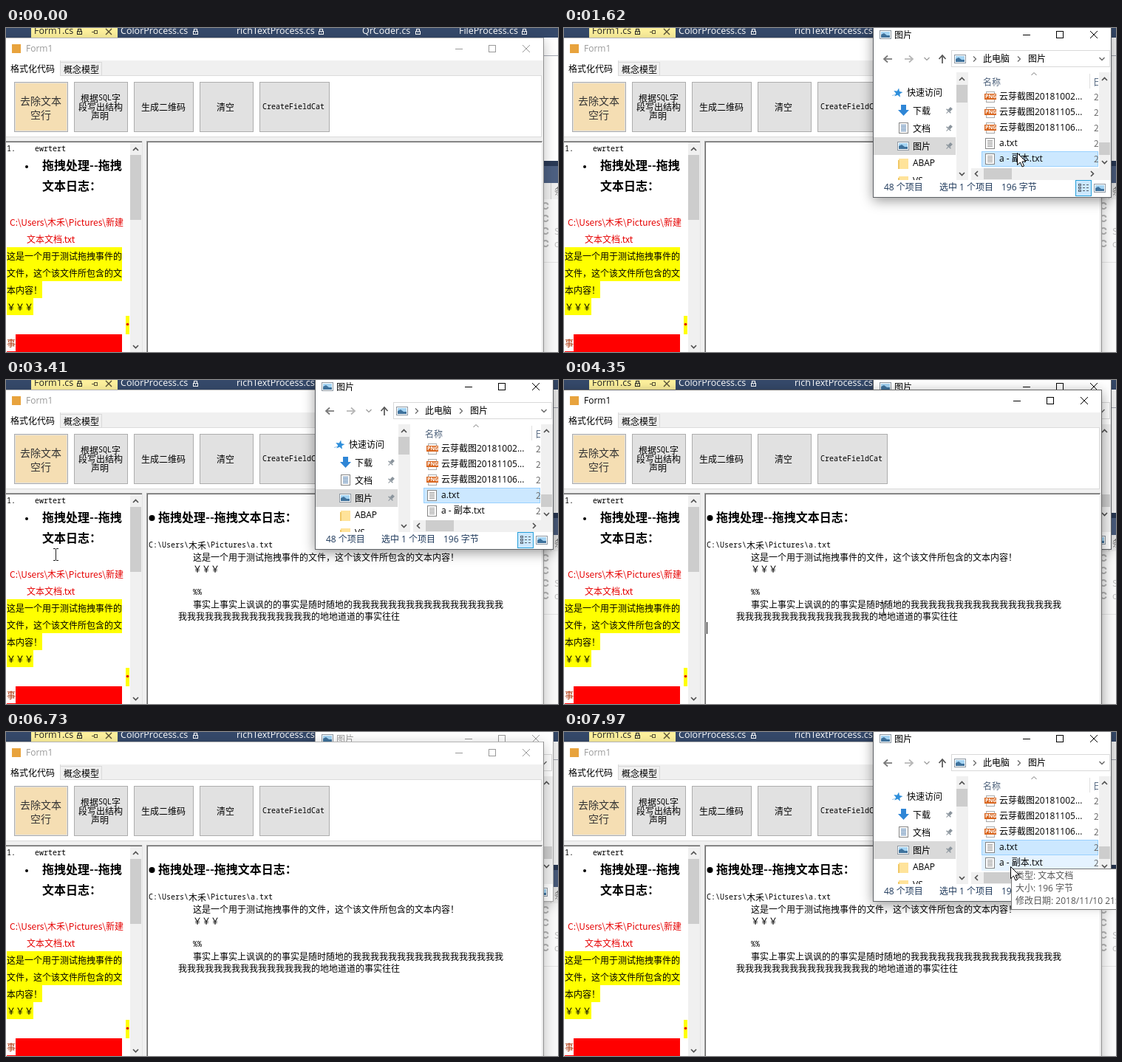
Write an HTML page with a canvas that moves like this. It is 747 px wide and 439 px high and loops after 8 s.

```html
<!DOCTYPE html>
<html lang="zh">
<head>
<meta charset="utf-8">
<title>Form1</title>
<style>
html, body { margin: 0; width: 100%; height: 100%; overflow: hidden; background: #fff; }
canvas { display: block; }
</style>
</head>
<body>
<canvas id="stage" width="747" height="439"></canvas>
<script>
const LOOP = 8000;
const ctx = document.getElementById('stage').getContext('2d');
const CJK = '"Noto Sans CJK SC", "Noto Sans CJK", "Noto Sans CJK JP", sans-serif';
const UI = '"Open Sans", "Noto Sans", sans-serif';
const MIXED = '"Open Sans", ' + CJK;
const MONO = '"Noto Sans Mono", monospace';
const USER = '木禾';

function rect(x, y, w, h, color) {
  ctx.fillStyle = color;
  ctx.fillRect(x, y, w, h);
}

function frame(x, y, w, h, color) {
  ctx.strokeStyle = color;
  ctx.lineWidth = 1;
  ctx.strokeRect(x + .5, y + .5, w - 1, h - 1);
}

function box(x, y, w, h, fill, edge) {
  rect(x, y, w, h, fill);
  frame(x, y, w, h, edge);
}

function raised(x, y, w, h, fill, strength) {
  ctx.save();
  ctx.shadowColor = `rgba(0,0,0,${strength})`;
  ctx.shadowBlur = 16;
  ctx.shadowOffsetY = 4;
  rect(x, y, w, h, fill);
  ctx.restore();
}

function line(color, width, ...p) {
  ctx.strokeStyle = color;
  ctx.lineWidth = width;
  ctx.beginPath();
  for (let i = 0; i < p.length; i += 2) ctx.lineTo(p[i], p[i + 1]);
  ctx.stroke();
}

function shape(color, ...p) {
  ctx.fillStyle = color;
  ctx.beginPath();
  for (let i = 0; i < p.length; i += 2) ctx.lineTo(p[i], p[i + 1]);
  ctx.closePath();
  ctx.fill();
}

function dot(x, y, r, color) {
  ctx.fillStyle = color;
  ctx.beginPath();
  ctx.arc(x, y, r, 0, 7);
  ctx.fill();
}

function text(s, x, y, color = '#000', font = '12px ' + CJK) {
  ctx.font = font;
  ctx.fillStyle = color;
  ctx.fillText(s, x, y);
}

// Song style: full-width glyphs of 12px, half-width ones of 6px
function song(s, x, y, color = '#000') {
  for (const run of s.match(/[ -~]+|[^ -~]+/g)) {
    const font = run < '\x7f' ? '10px ' + MONO : '12px ' + CJK;
    text(run, x, y, color, font);
    x += ctx.measureText(run).width;
  }
}

function chevron(x, y, dir, color = '#505050', width = 1.6) {
  ctx.save();
  ctx.translate(x, y);
  ctx.rotate(dir * Math.PI / 2);
  line(color, width, -3.5, 2, 0, -1.5, 3.5, 2);
  ctx.restore();
}

function arrow(x, y, dir, color) {
  ctx.save();
  ctx.translate(x, y);
  ctx.rotate(dir * Math.PI / 2);
  line(color, 1.7, 0, 6, 0, -5);
  line(color, 1.7, -4.5, 0, 0, -5, 4.5, 0);
  ctx.restore();
}

function windowButtons(x, y, color) {
  rect(x, y, 10, 1, color);
  frame(x + 45, y - 5, 10, 10, color);
  line(color, 1, x + 91, y - 5, x + 101, y + 5);
  line(color, 1, x + 101, y - 5, x + 91, y + 5);
}

function lock(x, color) {
  frame(x - 3, 4, 7, 5, color);
  frame(x - 2, 1, 5, 4, color);
  rect(x, 6, 1, 1, color);
}

function pin(x, y) {
  ctx.save();
  ctx.translate(x, y);
  ctx.rotate(.75);
  rect(-2, -5, 4, 5, '#8a949c');
  rect(-4, 0, 8, 1.5, '#8a949c');
  rect(-.5, 1, 1, 4, '#8a949c');
  ctx.restore();
}

function picture(x, y) {
  box(x, y, 16, 12, '#fff', '#8d98a3');
  rect(x + 2, y + 2, 12, 8, '#a5d4f3');
  shape('#3f729c', x + 2, y + 10, x + 2, y + 6, x + 6, y + 4, x + 10, y + 7, x + 14, y + 7, x + 14, y + 10);
}

function sheet(x, y, mark) {
  box(x, y, 13, 15, '#fff', '#858585');
  for (let i = 3; i < 13; i += 2) rect(x + 3, y + i, 7, 1, mark);
}

/* ---- editor behind everything ---- */
function editor() {
  rect(0, 0, 747, 439, '#fff');
  rect(0, 0, 747, 13, '#35496a');
  rect(34, 0, 117, 13, '#fff29d');
  const tabs = [['Form1.cs', 38, 99], ['ColorProcess.cs', 155, 256], ['richTextProcess.cs', 312, 426],
    ['QrCoder.cs', 482, 557], ['FileProcess.cs', 613, 701]];
  tabs.forEach(([name, x, lx], i) => {
    const c = i ? '#fff' : '#222';
    text(name, x, 5, c, '12.5px ' + UI);
    lock(lx, c);
  });
  line('#5a5338', 1, 116, 5.5, 119, 5.5);
  frame(119, 3, 5, 5, '#5a5338');
  line('#5a5338', 1.4, 135, 1, 143, 9);
  line('#5a5338', 1.4, 143, 1, 135, 9);
  rect(727, 37, 20, 1, '#a5a9b5');
  rect(727, 180, 20, 7, '#293955');
  rect(727, 187, 20, 23, '#4d6082');
  rect(727, 210, 20, 22, '#f0f0f0');
  rect(727, 232, 20, 207, '#fafafa');
  rect(727, 317, 20, 1, '#e4e4e4');
  rect(737, 210, 1, 22, '#d0d0d0');
  text('条', 742, 221, '#777');
  for (let i = 0; i < 4; i++) {
    const y = 241 + 17 * i;
    ctx.strokeStyle = '#b4b4b4';
    ctx.lineWidth = 2;
    for (const a of [.4, 3.5]) {
      ctx.beginPath();
      ctx.arc(730, y, 4, a, a + 2.4);
      ctx.stroke();
    }
  }
  text('S', 742, 275, '#c0c0c0');
  text('c', 742, 292, '#c0c0c0');
}

/* ---- Form1 ---- */
function scrollBar(x, y, h, thumbY, thumbH, w = 16) {
  rect(x, y, w, h, '#f0f0f0');
  rect(x, thumbY, w - 1, thumbH, '#cdcdcd');
  chevron(x + 7.5, y + 9, 0);
  chevron(x + 7.5, y + h - 8, 2);
}

function button(x, w, lines) {
  box(x, 73, w, 68, '#e1e1e1', '#adadad');
  lines.forEach(([s, dx, y]) => song(s, x + dx, y));
}

function log() {
  dot(197.5, 187, 4, '#000');
  text('拖拽处理--拖拽文本日志：', 206, 186, '#000', 'bold 16px ' + CJK);
  song(`C:\\Users\\${USER}\\Pictures\\a.txt`, 193, 224);
  song('这是一个用于测试拖拽事件的文件，这个该文件所包含的文本内容！', 253, 240);
  song('￥￥￥', 253, 256);
  song('%%', 253, 288);
  song('事实上事实上讽讽的的事实是随时随地的' + '我'.repeat(17), 253, 304);
  song('我'.repeat(15) + '的地地道道的事实往往', 233, 320);
}

function notes() {
  song('1.', 1, 164);
  song('ewrtert', 39, 164);
  dot(28, 188, 2, '#000');
  text('拖拽处理--拖拽', 49, 186, '#000', 'bold 16px ' + CJK);
  text('文本日志：', 49, 214, '#000', 'bold 16px ' + CJK);
  text(`C:\\Users\\${USER}\\Pictures\\新建`, 5, 263, '#e60000');
  text('文本文档.txt', 28, 286, '#e60000');
  const marked = [['这是一个用于测试拖拽事件的', 156], ['文件，这个该文件所包含的文', 156],
    ['本内容！', 48], ['￥￥￥', 36]];
  marked.forEach(([s, w], i) => {
    rect(1, 297 + 23 * i, w, 23, '#ff0');
    text(s, 1, 309 + 23 * i);
  });
  rect(162, 390, 5, 25, '#ff0');
  dot(164.5, 401.5, 1.8, '#e00000');
  text('事', 1, 427, '#b03a10');
  rect(13, 415, 144, 24, '#f00');
  rect(1, 438, 12, 1, '#f00');
}

function form(active, filled, caret) {
  const ink = active ? '#000' : '#999';
  raised(-20, 13, 748, 460, '#f0f0f0', active ? .4 : .25);
  rect(0, 13, 727, 31, '#fff');
  rect(0, 13, 728, 1, active ? '#6b6b6b' : '#b5b5b5');
  rect(727, 13, 1, 426, active ? '#6b6b6b' : '#8f8f8f');
  rect(8, 22, 12, 12, '#e8a33d');
  text('Form1', 27, 29, ink, '12px ' + UI);
  windowButtons(608, 28, ink);

  box(-1, 64, 726, 84, '#fff', '#dcdcdc');
  box(73, 46, 57, 19, '#f0f0f0', '#d9d9d9');
  rect(0, 44, 73, 22, '#fff');
  rect(73, 44, 1, 21, '#d9d9d9');
  song('格式化代码', 6, 55);
  song('概念模型', 78, 56);
  button(11, 73, []);
  rect(13, 75, 69, 64, '#f5deb3');
  text('去除文本', 19, 99, '#333', '14px ' + CJK);
  text('空行', 33, 118, '#333', '14px ' + CJK);
  button(92, 73, [['根据SQL字', 9, 95], ['段写出结构', 6, 107], ['声明', 23, 119]]);
  button(173, 81, [['生成二维码', 10, 107]]);
  button(262, 73, [['清空', 23, 107]]);
  button(343, 95, [['CreateFieldCat', 4, 107]]);

  rect(0, 153, 185, 286, '#fff');
  rect(0, 153, 185, 1, '#a0a0a0');
  rect(0, 154, 185, 1, '#696969');
  scrollBar(168, 155, 285, 172, 88);
  rect(184, 153, 1, 286, '#e3e3e3');
  notes();

  rect(190, 153, 536, 286, '#a0a0a0');
  rect(191, 154, 534, 285, '#696969');
  rect(192, 155, 533, 284, '#fff');
  rect(725, 154, 1, 285, '#e3e3e3');
  if (filled) log();
  if (caret) rect(193, 328, 1, 16, '#000');
}

/* ---- file window ---- */
const FILES = ['云芽截图20181002...', '云芽截图20181105...', '云芽截图20181106...', 'a.txt', 'a - 副本.txt'];

function fileRow(name, i, selected, hover) {
  const y = 83 + 21 * i, mid = y + 10.5;
  if (i === selected) box(565, y, 158, 21, '#cce8ff', '#99d1ff');
  else if (i === hover) rect(565, y, 158, 21, '#e5f3ff');
  if (i < 3) {
    box(571, y + 3, 12, 15, '#fff', '#a9a9a9');
    rect(569, y + 6, 16, 8, '#d9661f');
    text('PNG', 570, mid, '#fff', 'bold 7px ' + UI);
  } else sheet(570, y + 3, '#9a9a9a');
  text(name, 589, mid, '#000', '12px ' + MIXED);
  text('2', 717, mid, '#6d6d6d');
}

function navPane() {
  ctx.save();
  ctx.beginPath();
  ctx.rect(419, 58, 128, 148);
  ctx.clip();
  rect(419, 148, 111, 24, '#d9d9d9');
  ctx.save();
  ctx.translate(452, 88);
  const star = [];
  for (let i = 0; i < 10; i++) {
    const r = i % 2 ? 2.8 : 6.5, a = i * Math.PI / 5 - 1.4;
    star.push(r * Math.cos(a), r * Math.sin(a));
  }
  shape('#2f8fdb', ...star);
  ctx.restore();
  line('#9cc3e4', 1, 444, 91.5, 448, 90.5);
  text('快速访问', 464, 87);
  shape('#2f86d6', 456, 104, 463, 104, 463, 111, 467, 111, 459.5, 119, 452, 111, 456, 111);
  sheet(453, 128, '#5b86b3');
  picture(451, 154);
  ['下载', '文档', '图片'].forEach((s, i) => {
    text(s, 472, 112 + 24 * i);
    pin(521, 112 + 24 * i);
  });
  for (const y of [177, 201]) {
    rect(453, y, 13, 14, '#ffe39a');
    rect(452, y + 2, 2, 12, '#f0c766');
  }
  text('ABAP', 472, 184, '#000', '12px ' + MIXED);
  text('VS', 472, 208, '#000', '12px ' + MIXED);
  scrollBar(531, 60, 146, 77, 24);
  ctx.restore();
}

function explorer(o) {
  const ink = `rgb(${o.dim},${o.dim},${o.dim})`;
  ctx.save();
  ctx.globalAlpha = o.alpha;
  ctx.translate(0, o.dy);
  raised(418, -2, 323, 232, '#fff', o.front ? .4 : .25);
  frame(418, -2, 323, 232, o.dim ? '#a8a8a8' : '#5f6266');
  picture(427, 3);
  text('图片', 447, 9, ink);
  windowButtons(621, 9, ink);

  arrow(438, 42, 3, '#777');
  arrow(467, 42, 1, '#b5b5b5');
  chevron(491, 42, 2, '#999', 1.2);
  arrow(512, 42, 0, '#555');
  frame(524, 30, 215, 23, '#d9d9d9');
  picture(528, 36);
  chevron(556, 42, 1, '#666', 1.2);
  text('此电脑', 567, 41);
  chevron(616, 42, 1, '#666', 1.2);
  text('图片', 628, 41);
  chevron(728, 42, 2, '#666', 1.4);

  navPane();
  ctx.save();
  ctx.beginPath();
  ctx.rect(551, 58, 172, 132);
  ctx.clip();
  chevron(636, 62, 0, '#777', 1);
  text('名称', 567, 73, '#4c607a');
  rect(711, 62, 1, 20, '#e0e0e0');
  text('日', 716, 73, '#4c607a');
  FILES.forEach((f, i) => fileRow(f, i, o.selected, o.hover));
  ctx.restore();
  scrollBar(724, 60, 130, 155, 17);
  rect(551, 190, 189, 16, '#f0f0f0');
  rect(568, 190, 38, 15, '#cdcdcd');
  chevron(558, 197.5, 3);
  chevron(715, 197.5, 1);

  text('48 个项目', 433, 217, '#1e395b', '12px ' + MIXED);
  text('选中 1 个项目', 508, 217, '#1e395b', '12px ' + MIXED);
  text('196 字节', 592, 217, '#1e395b', '12px ' + MIXED);
  box(692, 206, 22, 22, '#cce8ff', '#26a0da');
  for (let i = 0; i < 3; i++) {
    frame(696, 211 + 4 * i, 4, 3, '#55606b');
    rect(702, 212 + 4 * i, 3, 1, '#55606b');
    rect(707, 212 + 4 * i, 3, 1, '#55606b');
  }
  picture(717, 211);
  ctx.restore();
}

function tooltip() {
  box(605, 185, 150, 56, '#fff', '#767676');
  ['类型: 文本文档', '大小: 196 字节', '修改日期: 2018/11/10 21:30'].forEach((s, i) =>
    text(s, 611, 195.5 + 17 * i, '#575757', '12px ' + MIXED));
}

/* ---- pointer ---- */
function pointer(x, y, copying) {
  const p = [0, 0, 0, 16, 4, 12.5, 6.5, 18.5, 9, 17.5, 6.5, 11.5, 11.5, 11.5].map((v, i) => v + (i % 2 ? y : x));
  ctx.lineJoin = 'miter';
  shape('#fff', ...p);
  line('#000', 1, ...p, p[0], p[1]);
  if (copying) {
    box(x + 9, y + 16, 11, 11, '#fff', '#666');
    line('#000', 1, x + 11.5, y + 21.5, x + 17.5, y + 21.5);
    line('#000', 1, x + 14.5, y + 18.5, x + 14.5, y + 24.5);
  }
}

function beam(x, y) {
  x = Math.round(x);
  y = Math.round(y);
  rect(x, y - 7, 1, 15, '#222');
  for (const dy of [-8, 8]) {
    rect(x - 3, y + dy, 3, 1, '#222');
    rect(x + 1, y + dy, 3, 1, '#222');
  }
}

// Keys are [time, x, y]; null outside the span
function along(keys, t, end) {
  if (t < keys[0][0] || t >= end) return null;
  const i = keys.findIndex(k => k[0] > t);
  if (i < 0) return keys[keys.length - 1].slice(1);
  const [a, b] = [keys[i - 1], keys[i]];
  const p = (t - a[0]) / (b[0] - a[0]);
  return [a[1] + (b[1] - a[1]) * p, a[2] + (b[2] - a[2]) * p];
}

const PICK = [[1230, 668, 314], [1400, 640, 230], [1600, 613, 169], [1690, 613, 169], [1930, 604, 155],
  [2320, 604, 155], [2390, 602, 155]];
const DRAG = [[2580, 602, 155], [2760, 430, 172], [2920, 200, 212], [3050, 20, 232], [3200, 58, 228]];
const READ = [[3410, 67, 236], [3520, 67, 236], [3800, 220, 268], [4050, 420, 319], [4180, 432, 310],
  [4450, 432, 310], [4720, 440, 328], [4820, 440, 328], [5040, 532, 322]];
const HOVER = [[7190, 690, 350], [7300, 660, 220], [7410, 636, 119], [7490, 636, 119], [7720, 604, 182]];

function draw(t) {
  const pick = along(PICK, t, 2580), drag = along(DRAG, t, 3410);
  const read = along(READ, t, 5110), hover = along(HOVER, t, LOOP);
  const arrowAt = pick || drag || hover;
  const active = t >= 4350 && t < 6730;
  const front = t < 4350 || t >= 6800;
  const caret = active && (t < 4870 || (t >= 5410 && t < 5870) || t >= 6410);
  const fade = Math.min(1, Math.max(0, (t - 4430) / 290));
  const win = {
    front,
    dim: front ? 0 : Math.round(153 * fade),
    alpha: t < 920 ? .35 : t < 1000 ? .8 : 1,
    dy: t < 920 ? 70 : t < 1000 ? 18 : 0,
    selected: t < 1860 ? 4 : 3,
    hover: arrowAt && !drag && arrowAt[0] > 565 && arrowAt[0] < 723 ? Math.floor((arrowAt[1] - 83) / 21) : -1
  };

  ctx.textBaseline = 'middle';
  editor();
  if (!front) explorer(win);
  form(active, t >= 3340, caret);
  if (front && t >= 850) explorer(win);
  if (t >= 7960) tooltip();
  if (arrowAt) pointer(Math.round(arrowAt[0]) + .5, Math.round(arrowAt[1]) + .5, !!drag);
  if (read) beam(...read);
}

const start = performance.now();
function tick() {
  draw((performance.now() - start) % LOOP);
  requestAnimationFrame(tick);
}
tick();
</script>
</body>
</html>
```
